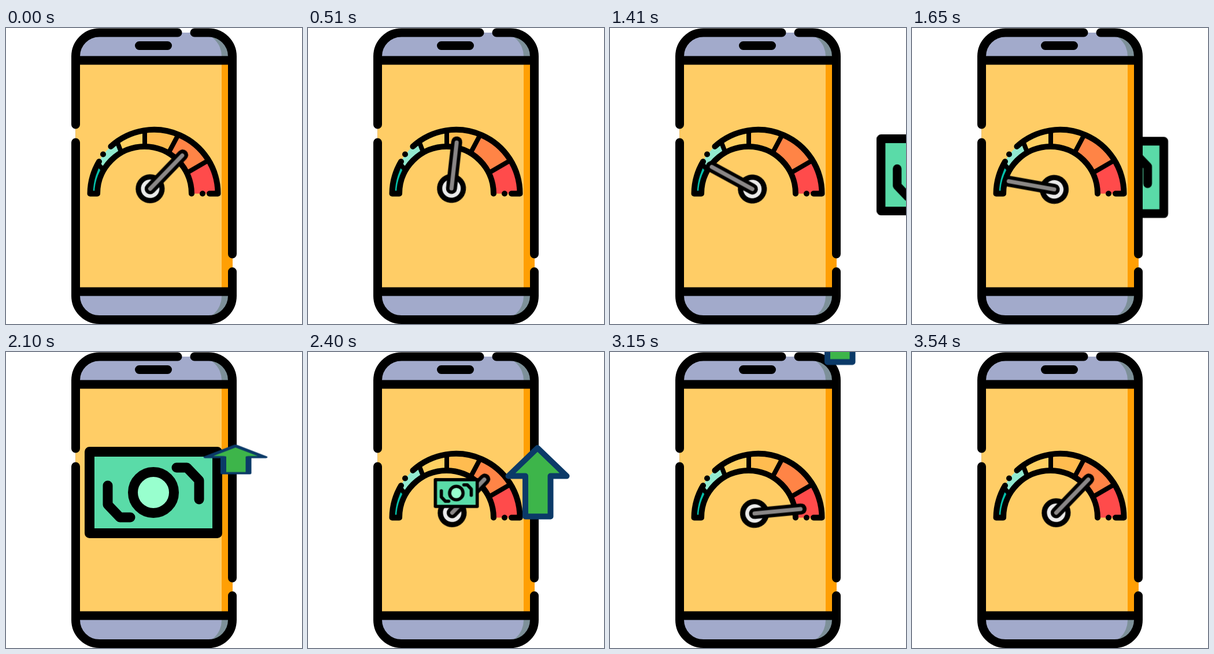
Write an HTML page that moves like this. It is 512 by 512 pixels and loops after 3.57 s.

```html
<!DOCTYPE html>
<html lang="en">
<head>
<meta charset="utf-8">
<title>Phone gauge</title>
<style>
html, body { margin: 0; width: 100%; height: 100%; overflow: hidden; background: #fff; }
svg { display: block; width: 100vw; height: 100vh; }
.line { fill: none; stroke: #000; stroke-linecap: round; stroke-linejoin: round; }
.thick { stroke-width: 15; }
.thin { stroke-width: 10; }
.needle, .note, .front, .grow, .rise, .trail { animation: 3570ms linear infinite; }
.needle { animation-name: needle; }
.note { animation-name: note; }
.front { animation-name: front; animation-timing-function: step-end; }
.grow { animation-name: grow; transform-origin: 397px 160px; }
.rise { animation-name: rise; }
.trail { animation-name: trail; }

@keyframes needle {
  0% { transform: translate(248px, 279.500px) rotate(44deg); }
  28.57% { transform: translate(248px, 279.500px) rotate(-31deg); }
  46.22% { transform: translate(248px, 279.500px) rotate(-80deg); }
  67.23% { transform: translate(248px, 279.500px) rotate(44deg); }
  80.67%, 90.76% { transform: translate(248px, 279.500px) rotate(84.5deg); }
  94.96% { transform: translate(248px, 279.500px) rotate(-80deg); }
  98.32%, 100% { transform: translate(248px, 279.500px) rotate(44deg); }
}
@keyframes note {
  0%, 37.82% { transform: translate(625px, 253px) scale(.886); }
  46.22% { transform: translate(337.5px, 258.5px) scale(.886); }
  51.3% { transform: translate(311px, 253px) scale(1.33); }
  57.98%, 60.5% { transform: translate(255px, 243px) scale(1); }
  67.23% { transform: translate(256.5px, 244px) scale(.33); }
  70.59%, 100% { transform: translate(257px, 244px) scale(0); }
}
@keyframes front {
  0% { visibility: hidden; }
  47% { visibility: visible; }
  71%, 100% { visibility: hidden; }
}
@keyframes grow {
  0%, 56.3% { transform: scaleY(0); }
  58.82% { transform: scaleY(.395); }
  63.03%, 100% { transform: scaleY(1); }
}
@keyframes rise {
  0%, 68.07% { transform: translateY(0); animation-timing-function: ease-in-out; }
  75.63% { transform: translateY(-49px); animation-timing-function: ease-in-out; }
  80.67% { transform: translateY(-36px); animation-timing-function: ease-in; }
  89.08%, 100% { transform: translateY(-310px); }
}
@keyframes trail {
  0%, 70% { opacity: 0; }
  74%, 80.67% { opacity: .52; }
  84.5%, 100% { opacity: 0; }
}
</style>
</head>
<body>
<svg viewBox="0 0 512 512">
  <defs>
    <g id="bill" class="line" stroke-width="17">
      <rect x="-110.5" y="-70.5" width="221" height="141" fill="#5adba8"/>
      <circle r="35.5" fill="#98ffce"/>
      <path id="mark" d="M40-43H58L79-21V12"/>
      <use href="#mark" transform="rotate(180)"/>
    </g>
    <clipPath id="body"><rect x="120.5" y="8" width="271.5" height="497" rx="41"/></clipPath>
  </defs>

  <g class="note"><use href="#bill"/></g>

  <g clip-path="url(#body)">
    <rect x="120" y="8" width="272" height="497" fill="#7d9099"/>
    <rect x="102" y="8" width="271" height="497" rx="41" fill="#a2aacb"/>
    <rect x="120" y="56" width="272" height="400" fill="#ff9f04"/>
    <rect x="120" y="56" width="253" height="400" fill="#ffcd66"/>
  </g>
  <path class="line thick" d="M120.5 167V49A41 41 0 0 1 161.5 8H297M326 8H350.5A41 41 0 0 1 391.5 49V391M391.5 421.5V463.5A41 41 0 0 1 350.5 504.5H161.5A41 41 0 0 1 120.5 463.5V198M120.5 56H391.5M120.5 456H391.5M230.5 30.5H279.5"/>

  <g transform="translate(0 -.5)">
    <g id="bands"></g>
    <path class="line thin" d="M161 231.500A110.5 110.5 0 0 0 145.500 287H158A81.5 81.5 0 0 1 321 287M168 219h.01M181.400 205.400A110.5 110.5 0 0 1 366.5 287H352M340 287h.01"/>
    <path id="ticks" class="line" stroke-width="8"/>
  </g>

  <g class="needle">
    <circle cy="-2" r="20.5" fill="#ebebeb" stroke="#000" stroke-width="9"/>
    <path class="line" d="M0-2V-83" stroke-width="19"/>
    <path class="line" d="M0-2V-82" stroke-width="7" style="stroke:#8a8787"/>
  </g>

  <g class="front"><g class="note"><use href="#bill"/></g></g>

  <path class="line trail thin" style="stroke:#1c3b54" d="M376 252H396M376 266.5H396M376 281.5H396"/>
  <g class="rise">
    <path class="grow" d="M397 166L447.5 214.5H419.5V284.5H376V214.5H346.5Z" fill="#3db54a" stroke="#0b3a68" stroke-width="10" stroke-linejoin="round"/>
  </g>
</svg>
<script>
// Band borders: outer point, then inner point.
const edges = [
  [145.5, 287, 158, 287],
  [158.5, 235, 168.5, 246],
  [192, 196.5, 199.5, 216],
  [240, 177.5, 240, 205.5],
  [298, 185, 281, 217],
  [350, 229.5, 313, 251],
  [366.5, 287, 321, 287]
];
const colors = ['#05c0aa', '#92ead0', '#ffd062', '#ffbc50', '#ff8446', '#ff4b4b'];

bands.innerHTML = colors.map((color, i) => {
  const [ax, ay, bx, by] = edges[i];
  const [cx, cy, dx, dy] = edges[i + 1];
  return `<path fill="${color}" d="M${ax} ${ay}A110.5 110.5 0 0 1 ${cx} ${cy}L${dx} ${dy}A81.5 81.5 0 0 0 ${bx} ${by}Z"/>`;
}).join('');

ticks.setAttribute('d', edges.slice(1, -1)
  .map(([ax, ay, bx, by]) => `M${ax} ${ay}L${bx} ${by}`).join(''));
</script>
</body>
</html>
```
